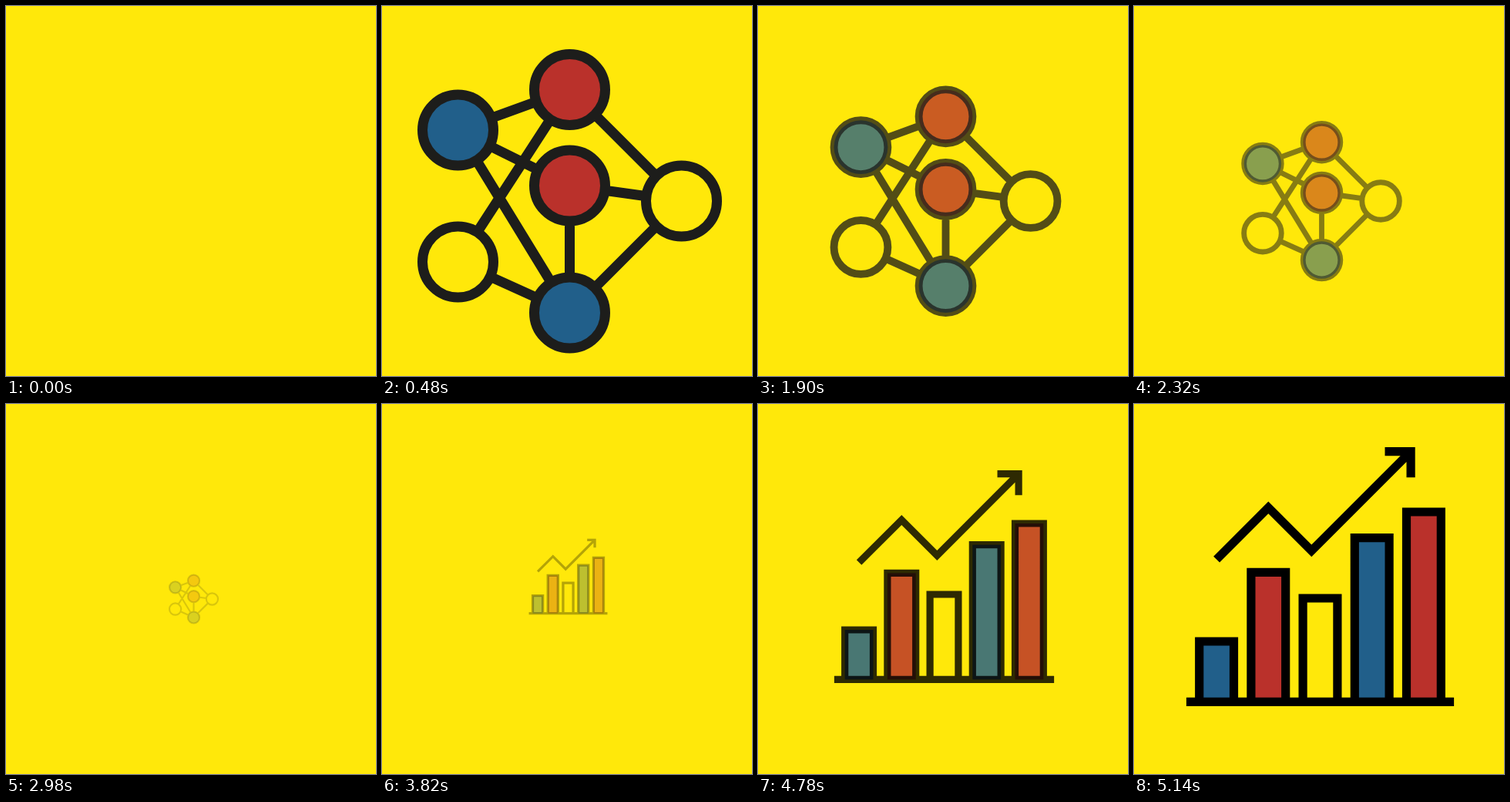
Write an HTML page with a canvas that moves like this. It is 480x480 px and loops after 5600 ms.

```html
<!DOCTYPE html>
<html lang="en">
<head>
<meta charset="utf-8">
<title>Network and chart</title>
<style>
  html, body { margin: 0; width: 100%; height: 100%; overflow: hidden; background: #ffe80a; }
  canvas { display: block; width: 100%; height: 100%; }
</style>
</head>
<body>
<canvas id="stage" width="480" height="480"></canvas>
<script>
const ctx = document.getElementById('stage').getContext('2d');
const LOOP = 5600, STEP = 60, RATE = 0.033;
const YELLOW = '#ffe80a', RED = '#ba312b', BLUE = '#215f8a';

// Network: node x, y, fill, relative to its centre
const RADIUS = 46;
const nodes = [
  [-145, -92, BLUE], [0, -144.5, RED], [0, -20, RED],
  [145, 0, null], [-145, 79, null], [0, 145, BLUE]
];
const links = [[0, 1], [0, 2], [0, 5], [1, 4], [1, 3], [2, 3], [2, 5], [4, 5], [5, 3]];

// Chart: bar height in stroke widths, fill
const UNIT = 11.2;
const bars = [[8, BLUE], [16, RED], [13, null], [20, BLUE], [23, RED]];
const trend = [[3.5, 17], [9.5, 23], [14.5, 18], [26, 29.5]];
const arrow = [[23, 29.5], [26, 29.5], [26, 26.5]];

function polyline(points) {
  points.forEach(([x, y], i) => i ? ctx.lineTo(x, y) : ctx.moveTo(x, y));
}

function circle(x, y) {
  ctx.moveTo(x + RADIUS, y);
  ctx.arc(x, y, RADIUS, 0, Math.PI * 2);
}

function drawNetwork(scale, alpha) {
  ctx.save();
  ctx.translate(243.5, 253);
  ctx.scale(scale, scale);
  ctx.globalAlpha = alpha;
  for (const [x, y, fill] of nodes) {
    if (!fill) continue;
    ctx.beginPath();
    circle(x, y);
    ctx.fillStyle = fill;
    ctx.fill();
  }
  // One path, so overlapping strokes keep an even tone
  ctx.beginPath();
  for (const [x, y] of nodes) circle(x, y);
  for (const [a, b] of links) {
    const [ax, ay] = nodes[a], [bx, by] = nodes[b];
    const d = Math.hypot(bx - ax, by - ay);
    const dx = (bx - ax) / d * RADIUS, dy = (by - ay) / d * RADIUS;
    polyline([[ax + dx, ay + dy], [bx - dx, by - dy]]);
  }
  ctx.lineWidth = 13;
  ctx.strokeStyle = '#1d1d1b';
  ctx.stroke();
  ctx.restore();
}

function drawChart(scale, alpha) {
  const box = ([h], i) => [1.5 + 6 * i, 0.5, 4, h - 1];
  ctx.save();
  ctx.translate(241.5, 224);
  ctx.scale(scale * UNIT, -scale * UNIT);
  ctx.translate(-15.5, -15);
  ctx.globalAlpha = alpha;
  bars.forEach((bar, i) => {
    if (!bar[1]) return;
    ctx.fillStyle = bar[1];
    ctx.fillRect(...box(bar, i));
  });
  ctx.beginPath();
  bars.forEach((bar, i) => ctx.rect(...box(bar, i)));
  polyline([[0, 0.5], [31, 0.5]]);
  polyline(trend);
  polyline(arrow);
  ctx.lineWidth = 1;
  ctx.strokeStyle = '#000';
  ctx.stroke();
  ctx.restore();
}

function render(t) {
  ctx.fillStyle = YELLOW;
  ctx.fillRect(0, 0, 480, 480);
  if (t < 1480) {
    const alpha = Math.min(1, Math.floor(t / STEP) / 8);
    if (alpha > 0) drawNetwork(1, alpha);
  } else if (t < 3220) {
    const s = 0.99 - RATE * Math.floor((t - 1480) / STEP);
    drawNetwork(s, s);
  } else if (t >= 3400) {
    const s = Math.min(1, 0.0625 + RATE * Math.floor((t - 3400) / STEP));
    drawChart(s, s);
  }
}

const start = performance.now();
function tick() {
  render((performance.now() - start) % LOOP);
  requestAnimationFrame(tick);
}
tick();
</script>
</body>
</html>
```
